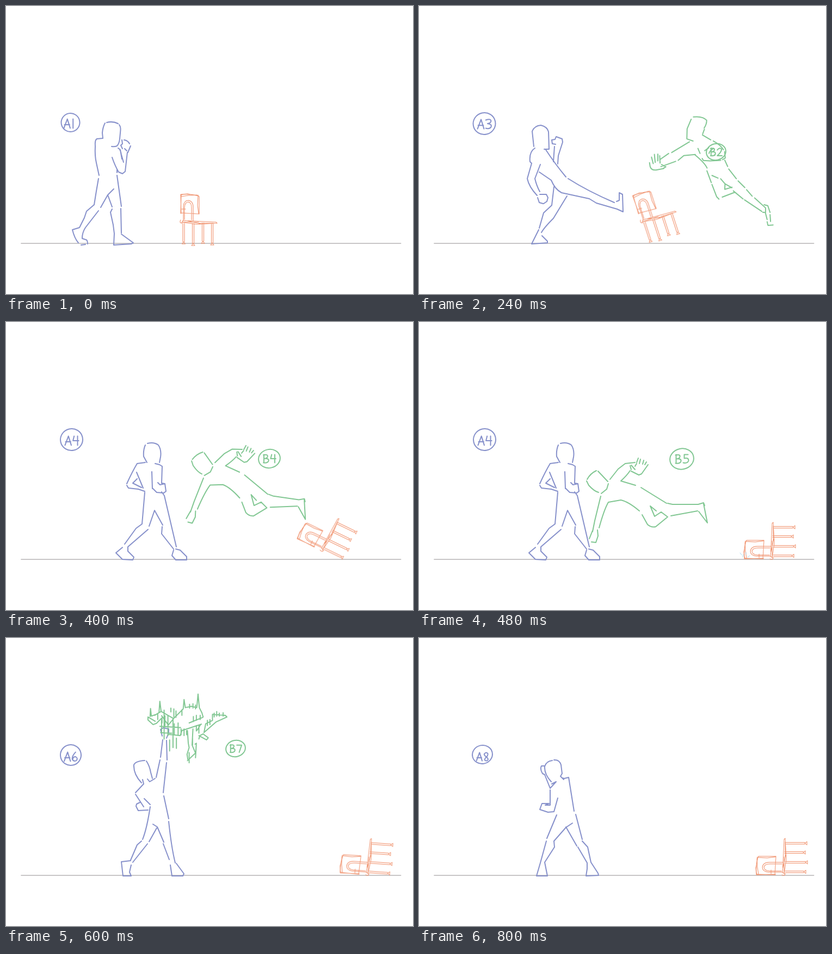
Animation, 748 px wide and 529 px high, one loop 920 ms. Source, as an HTML page:

```html
<!DOCTYPE html>
<html lang="en">
<head>
<meta charset="utf-8">
<title>Chair fight rough</title>
<style>
  html, body { margin: 0; width: 100%; height: 100%; overflow: hidden; background: #fff; }
  svg { display: block; width: 748px; height: 529px; }
  path, ellipse { fill: none; stroke-linecap: round; stroke-linejoin: round; vector-effect: non-scaling-stroke; }
  .a { stroke: #8791cb; stroke-width: 2; }
  .b { stroke: #82c793; stroke-width: 2; }
  .chair { stroke: #f0936f; stroke-width: 1.1; }
  .spark { stroke: #6cc8f4; stroke-width: 1.6; }
  .faint { stroke: #a9def5; stroke-width: 1; }
  .ground { stroke: #c8c6c7; stroke-width: 1.8; }
</style>
</head>
<body>
<svg id="stage" viewBox="0 0 748 529"></svg>
<script>
const LOOP = 920;
const stage = document.getElementById('stage');

function add(tag, attrs, parent = stage) {
  const el = document.createElementNS('http://www.w3.org/2000/svg', tag);
  for (const k in attrs) el.setAttribute(k, attrs[k]);
  return parent.appendChild(el);
}

// Held values: each [time, value] stays until the next one.
function hold(el, prop, steps) {
  const frames = steps.map(([t, v]) => ({ offset: t / LOOP, [prop]: v, easing: 'step-end' }));
  frames.push({ offset: 1, [prop]: steps[steps.length - 1][1] });
  el.animate(frames, { duration: LOOP, iterations: Infinity });
}

function show(el, from, to) {
  const steps = [[from, 'visible']];
  if (from > 0) steps.unshift([0, 'hidden']);
  if (to < LOOP) steps.push([to, 'hidden']);
  hold(el, 'visibility', steps);
}

const glyphs = {
  A: 'M0 16 6 0 11 16M1 10H10',
  B: 'M1 0V16M0 1Q9-1 8 4 7 8 1 8 11 7 10 12 9 17 0 16',
  1: 'M2 0V16',
  2: 'M0 4Q4-2 9 2 9 8 0 16H10',
  3: 'M0 1Q9-2 9 3 8 7 3 7 11 8 9 13 6 17 0 15',
  4: 'M2 0 0 8H10M8 0V16',
  5: 'M9 0H2V7Q10 5 10 11 8 17 0 15',
  6: 'M6 0Q0 6 0 12 2 17 7 15 11 11 6 8 2 8 1 12',
  7: 'M0 1H10L5 16',
  8: 'M8 2Q4-2 1 3 1 6 6 9 11 14 6 16 0 16 3 11 9 6 8 2'
};

function label(name, [x, y, rx, ry, size, dy = 0], parent) {
  const g = add('g', { transform: `translate(${x} ${y})`, 'aria-label': name }, parent);
  add('ellipse', { rx, ry, transform: 'rotate(-12)' }, g);
  const text = add('g', { transform: `translate(0 ${dy}) scale(${size})` }, g);
  [...name].forEach((c, i) =>
    add('path', { d: glyphs[c], transform: `translate(${i * 14 - 11.5} -8)` }, text));
}

const ticks = list => list.map(([x, top, end]) => `M${x} ${top}V${end}`).join('');

const poses = {
  guard: [
    'M178 243 177 233Q178 222 182 215M185 214Q196 211 206 216M208 218Q211 222 210.500 228L209 244Q208 253 204 257 200 259 194 258',
    'M178 243 167 244Q163 246 164 258 163 275 166 288L171 311M195 278Q200 293 207 305L214 308 219 304 223 269M204 301V306',
    'M206 261Q210 262 212 273L216 287M210 264 213 281M214 262 211 256 214 253 213 246M217 246Q224 247 227 253M229 257 224 269M218 262 222 266',
    'M170 317 166 340 162 365 148 377 144 389 135 407 122 411Q126 427 133 435M138 439 146 438M150 437Q150 429 146 429L140 427Q140 416 146 407L170 376',
    'M174 370 187 347 198 336M187 347 195 369M195 373 192 379 197 402 199 418 198 439 230 437 234 435 212 419M212 417 211 372M212 368 204 311'
  ],
  windup: [
    'M206 257 210 251Q203 232 205 217 208 211 220 211 233 211 236 217L237 254 229 256M203 255Q183 260 183 286 186 315 203 341M206 345 222 363',
    'M237 238 242 239 244 246V256M238 240 239 281M226 258 227 262 238 271M229 258 232 266M225 273 238 282 249 282 253 288Q250 296 240 297L228 293 209 311M228 293 217 292 214 301 220 299M247 259 251 283',
    'M254 293 271 336 280 329 283 320 289 319V334L280 352 267 344M264 340 249 320 242 315 240 306 225 335',
    'M222 367Q216 375 215 383L216 390 207 418M204 422 198 438Q212 440 235 434 234 430 225 429 216 425 216 418L232 386 240 364M238 357 227 331'
  ],
  kick: [
    'M211 258 208 230Q212 220 224 219 236 222 238 231L239 263H230M213 261Q202 268 204 286L207 289 199 317Q202 332 217 348',
    'M218 352 221 361 228 363M222 346 234 346 237 352 235 359 229 363M222 341Q216 330 213 317L223 291',
    'M233 264Q250 290 270 314M274 317Q310 340 359 361M363 359 368 357V343L374 346 375 378 364 373 326 362 313 354Q290 349 262 343 250 337 243 320L221 305',
    'M249 258 247 286M245 253 244 246 250 245 252 240 263 244 264 250 256 275 255 290M245 253 251 254',
    'M248 332 244 366 229 380 221 408M220 411 207 437 236 435V432L226 422M225 416Q230 407 247 390L272 349'
  ],
  turn: [
    'M259 258 253 247Q252 235 256 226M260 223Q272 220 280 226 286 235 284 248L282 258M256 258 241 260Q232 275 222 297',
    'M222 300 225 305 243 307 255 311M240 276 252 305M241 288 233 296 249 304M274 260 282 262 287 265 286 296 292 297 294 311 290 314 277 313 270 306M268 275 269 306M279 295 283 299 292 297',
    'M255 313 250 371 239 379 218 408M214 414 202 424 214 436 233 437 235 432 224 421V413L261 381M263 375 273 346 288 373M287 376 286 389 308 417',
    'M308 419 305 429 312 437H332V431L320 419 312 417M313 413Q303 370 291 319L286 312'
  ],
  punch: [
    'M231 254Q227 236 238 233L247 231M257 236Q264 243 267 265M232 257 243 271M243 266 244 274M259 267 266 269 282 266M285 267 290 268 302 285 307 274',
    'M309 267 305 257 310 250 316 244 325 254 322 264 311 268M314 272 312 300 301 302 284 288M246 274 228 288 232 310 237 325H249L254 314M240 295 248 307 247 316M240 295Q252 307 254 317L258 328 257 348',
    'M256 350 250 376 239 379 221 416M217 419 205 423 215 448 232 447 222 437 230 421 258 391M260 387 276 357 272 353 266 351',
    'M283 290 296 348M278 357 289 384M290 389 301 417M303 427 306 446 328 444 330 440 314 425M311 420 298 352'
  ],
  upper: [
    'M247 266Q232 250 233 233 236 226 253 225M256 226Q262 235 264 247L267 258M249 260 251 268 236 284M258 259 262 264 272 258',
    'M274 256 281 224M282 219 286 187M285 180 282 168 287 165 297 167V174L293 184M293 188 294 224M293 229 287 284M288 290 297 332',
    'M236 287 251 310M244 302 238 305 237 309 241 317 259 316M252 295 263 306M263 310Q257 350 249 370M247 373 239 380 227 408',
    'M297 337Q302 385 309 413M311 414 325 433 323 437H303L300 417M298 407 287 378M288 375 276 347 268 342M275 349 261 374M258 378 231 412M228 417 225 430 228 437H213L210 411 227 409'
  ],
  rest: [
    'M243 264Q230 250 231 236 234 226 245 225M248 224Q258 223 261 233L263 249 260 254 266 260M263 257 267 258 275 256 285 318',
    'M231 235 225 235Q222 241 227 249L231 251 241 276 252 264 244 268M241 279V307L232 307 239 304H226L222 315 237 320 248 319 255 294',
    'M253 325 235 368M234 373 223 413 216 437H236L231 412 249 384 248 373 270 348 282 340',
    'M270 347 290 382M292 384 309 413V424L307 437 330 436 329 432 316 412 310 384 300 373M300 370 288 324'
  ],
  run: [
    'M662 317 633 366M635 367 608 416 580 410 578 413Q590 427 606 435M613 434 615 436 618 419 643 381 645 372 688 327',
    'M645 372 643 377M678 323 667 380 690 379M667 376 679 322 682 330M690 379 700 377 720 376M704 332 687 368'
  ],
  dive: [
    'M381 233 378 252 382 270 394 271M384 228Q400 222 409 228 411 235 408 243M409 245 408 254M408 256 425 261M430 262Q445 266 452 273M455 276 459 287 455 291M452 293 433 299 421 301 418 298M412 290 406 282',
    'M425 276 419 283M434 275Q428 280 428 286M439 285V287M388 274 361 301M356 304 343 319M404 294 384 301 376 312M372 315 348 331',
    'M327 318 333 329M331 312 336 326M337 310 340 322M341 312 345 325M326 329 329 336Q333 342 341 339L354 333M348 327 357 329 353 333',
    'M404 295Q425 305 431 313M432 318 445 337M447 340 461 360 466 363M471 358 491 344M443 324 455 326M460 326 470 333 484 337M470 333 472 343 484 336M488 342 509 352M512 353 548 366',
    'M459 291 467 301M470 305 488 319M492 322 507 331M511 334 524 343M529 345 553 358 555 366 550 367M549 353 556 353 563 364M564 368 568 380M555 367 561 378M562 382 565 388 574 385'
  ],
  flop: [
    'M309 289Q315 278 326 273M329 274 347 293M348 297 345 307 335 315M308 292 312 300Q322 311 330 313M351 289 366 270 379 260 397 258M371 292Q382 282 388 273',
    'M388 264 390 271M390 263 397 271M397 265 400 260M400 258 403 250M405 260 407 252M411 261 413 254M415 262 418 257M421 262 409 279 404 281 390 274',
    'M371 292 398 300M408 304 455 333M457 333 466 335H513L523 332 525 337M523 334 530 369 514 348M512 347 463 356',
    'M457 358 435 376Q427 378 420 372L410 354M405 347Q385 330 371 327L348 331Q340 345 331 378M334 320 323 365 319 385M319 383 313 398M317 404 325 405 329 393 328 382M425 338 433 357 445 349M425 338 436 347M445 349 457 358'
  ],
  smear: [
    'M269 217 270 198 272 216 280 213M281 228 264 218V225L276 236 284 233 297 220M290 207 292 181 295 205 323 221M280 214 295 205M296 215 312 237 325 221 347 199 349 177 352 196 366 193 379 196 382 164 385 196 391 208 394 218',
    'M292 240 341 243M294 255 320 256M312 259 340 262 344 250 390 235M361 232 393 219M357 250 359 280 361 290M370 246 368 283M388 236 380 249M384 270 386 262 394 258 406 267 402 272 384 262',
    'M396 255 400 234 416 226V212L446 214 450 218 424 230 398 253M361 290 356 306 358 318M357 321 376 303 368 284M375 282 378 280 376 314',
    ticks([[287, 210, 224], [297, 222, 232], [302, 202, 270], [311, 214, 262], [304, 215, 240], [296, 225, 256], [318, 197, 206], [325, 199, 218], [330, 204, 219], [344, 201, 214], [323, 222, 290], [315, 272, 298], [331, 268, 292]]),
    ticks([[362, 188, 197], [370, 187, 197], [376, 190, 199], [371, 217, 229], [378, 214, 226], [387, 214, 224], [342, 246, 260], [349, 246, 262], [355, 250, 260], [378, 238, 251], [384, 238, 256], [404, 226, 238], [410, 224, 236], [420, 209, 218], [426, 205, 216], [432, 209, 216], [441, 208, 216], [361, 302, 326], [369, 268, 284], [326, 234, 260], [335, 232, 260]])
  ],
  tick: [
    'M319 101 309 148 296 131Q290 131 290 136L293 150 303 165M312 114V126M333 108 326 138M325 138 311 173M301 160 305 174M307 165V175M308 169 311 173'
  ]
};

// class, pose, label, from, to, ring [x, y, rx, ry, text size, text dy], pose transform
const cast = [
  ['a', 'guard', 'A1', 0, 160, [118.5, 214, 17, 17, 1.05, 2]],
  ['a', 'windup', 'A2', 160, 240, [120, 214, 20, 18.500, 1.1, 3]],
  ['a', 'kick', 'A3', 240, 400, [120, 216, 20.500, 20, 1.08, 1]],
  ['a', 'turn', 'A4', 400, 560, [120.5, 216, 20.500, 20, 1.05, 2]],
  ['a', 'punch', 'A5', 560, 600, [120.5, 226, 20.500, 20, 1.05, 5]],
  ['a', 'upper', 'A6', 600, 680, [119, 215, 19, 19, 1.05, 3], 'translate(2 0)'],
  ['a', 'upper', 'A7', 680, 800, [118.5, 214, 18.500, 20, 1.05, 4]],
  ['a', 'rest', 'A8', 800, 920, [116.5, 214, 18.500, 17, .95, 4]],
  ['b', 'run', 'B1', 160, 240, [610, 287, 18, 16, .88]],
  ['b', 'dive', 'B2', 240, 320, [546, 268, 18, 15, .88], 'translate(85 0) rotate(14 500 360)'],
  ['b', 'dive', 'B3', 320, 400, [485, 251, 18.500, 14.500, .88]],
  ['b', 'flop', 'B4', 400, 480, [484, 251, 20, 17, .95], 'translate(28 -20) rotate(8 430 320)'],
  ['b', 'flop', 'B5', 480, 560, [483, 251.5, 22, 19, 1]],
  ['b', 'smear', 'B6', 560, 600, [452, 256.5, 18, 16, .92]],
  ['b', 'smear', 'B7', 600, 680, [422, 203, 18, 15, .88], 'translate(55 -25) scale(.78)'],
  ['b', 'tick', 'B8', 680, 760, [392, 150, 17.500, 12.500, .82, 3]]
];

const ground = add('path', { class: 'ground', d: 'M28 436H725.500' });
hold(ground, 'transform', [[0, 'translateY(0px)'], [560, 'translateY(10px)'], [600, 'translateY(0px)']]);

// Chair, built around the left end of its seat
const leg = (x, top, end) =>
  `M${x - 1.5} ${top}V${end}M${x + 1.5} ${top}V${end}M${x - 3} ${end + 4}L${x} ${end}L${x + 3} ${end + 4}Z`;
const chair = add('g', { class: 'chair' });
add('path', {
  transform: 'translate(-321 -396)',
  d: 'M321 381 322 347Q330 344 352 348L355 350V382L321 380M322 381 321 346 334 345 354 349M353 347 352 366 354 381M322 350Q336 347 351 347' +
     'M326 393V368Q327 357 335 357 344 358 344 370V395M328 392V370Q329 360 335 360 341 361 341 371V393M323 373H330' +
     'M321 393Q318 398 323 399L325 394 386 397 388 399 350 401 323 397 354 397M352 399H381M330 394 357 400' +
     leg(326.5, 399, 433) + leg(344, 399, 436) + leg(362, 398, 432) + leg(379, 400, 435)
}, chair);
const place = (x, y, turn) => `translate(${x}px, ${y}px) rotate(${turn}deg)`;
hold(chair, 'transform', [
  [0, place(321, 396, 0)],
  [240, place(408, 396, -18)],
  [320, place(501, 405, -36)],
  [400, place(580, 420, -64)],
  [480, place(648, 435, -90)],
  [560, place(655, 435, -76)],
  [600, place(664, 435, -86)],
  [680, place(670, 435, -90)]
]);

for (const [cls, pose, name, from, to, ring, transform = ''] of cast) {
  const g = add('g', { class: cls });
  add('path', { d: poses[pose].join(''), transform }, g);
  label(name, ring, g);
  show(g, from, to);
}

// Impact marks
const marks = [
  ['spark', 320, 400, 'M487 422 528 434M503 428 531 436 507 431M520 421 530 434M468 436.500H530M482 438H528M534 435 543 431'],
  ['faint', 320, 400, 'M354 409 358 413M363 404 369 408M365 411 374 420'],
  ['faint', 480, 560, 'M590 424 593 428M601 423V427M596 427 595 432M604 432 608 429'],
  ['spark', 560, 600, 'M592 408H593M585 413 586 414M600 411V412M576 431 577 432']
];
for (const [cls, from, to, d] of marks) show(add('path', { class: cls, d }), from, to);
</script>
</body>
</html>
```
